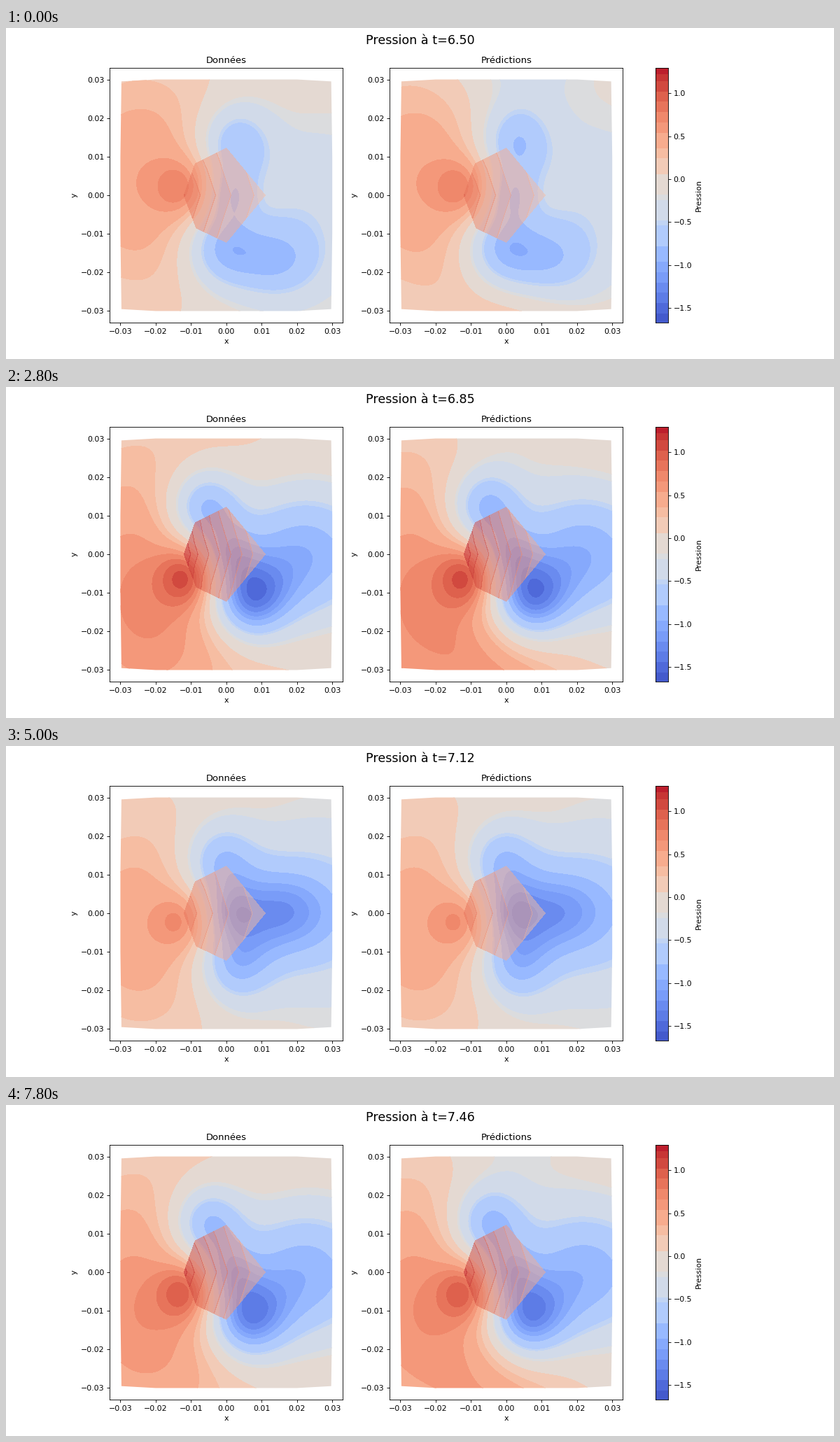
A matplotlib script for the animation above (8 s loop, 1183 by 473 pixels).

```python
import numpy as np
import matplotlib.pyplot as plt
from matplotlib.animation import FuncAnimation
from matplotlib.patches import Polygon

W, H, DPI = 1183, 473, 79
FRAMES, INTERVAL = 40, 200
P_MIN, P_MAX = -1.667, 1.293
UNIT = 0.01  # the flow is modelled in hundredths of the axis unit

plt.rcParams["font.family"] = "DejaVu Sans"

# Fine bands at both ends, wide ones around zero
EDGES = np.concatenate([[P_MIN], np.arange(-1.56, -0.9, 0.12),
                        [-0.78, -0.54, -0.48, -0.24, -0.18, 0.06, 0.24, 0.36],
                        np.arange(0.54, 1.2, 0.12), [1.22, P_MAX]])
mids = (EDGES[:-1] + EDGES[1:]) / 2
mids = mids - 0.04 * np.sign(mids + 0.21)
COLORS = plt.get_cmap("coolwarm")((mids - P_MIN) / (P_MAX - P_MIN))

axis = np.linspace(-3.05, 3.05, 150)
X, Y = np.meshgrid(axis, axis)

# Flow state at a few times: the vortex position and depth, the tilt of the
# incoming flow in degrees and the ambient pressure
KEY_TIMES = [0, 7, 14, 21, 29, 35, 39]
TILT = [9, -16, -28, -31, 13, 1, -24]
AMBIENT = [-0.12, -0.08, 0.08, -0.2, -0.1, -0.1, 0.03]
VORTEX_X = [1.37, 1.9, 0.8, 0.65, 1.9, 1.5, 0.85]
VORTEX_Y = [-1.72, -1.0, -1.0, -1.1, 1.2, 1.5, -1.05]
VORTEX_DEPTH = [0.66, 0.4, 0.25, 0.15, 0.9, 0.62, 0.25]

# Coarse triangles that bridge the obstacle: W, NW, N, E, S, SW
HOLE = UNIT * np.array([(-1.2, 0), (-0.88, 0.82), (0, 1.22),
                        (1.1, 0), (0, -1.22), (-0.85, -0.85)])
HOLE_TRI = [(0, 3, 2), (0, 2, 1), (0, 4, 3), (0, 5, 4)]
BRIDGE = np.array([1, 0.8, 0.5, 0.3, 0.5, 0.8])


def bump(x, y, sx, sy=None):
    sy = sy or sx
    return np.exp(-((X - x) / sx) ** 2 / 2 - ((Y - y) / sy) ** 2 / 2)


def polar(radius, angle):
    return radius * np.cos(angle), radius * np.sin(angle)


def pressure(n, predicted):
    """Pressure on the grid and the stagnation pressure for frame n."""
    tilt, ambient, vx, vy, depth = (
        np.interp(n, KEY_TIMES, v)
        for v in (TILT, AMBIENT, VORTEX_X, VORTEX_Y, VORTEX_DEPTH))
    front = np.pi - np.radians(tilt)
    peak = 0.33 + 0.013 * abs(tilt)
    suction = 0.64 + 0.013 * abs(tilt)
    if predicted:
        vx *= 0.85

    p = ambient + 0.65 * bump(*polar(2.4, front), 2.0, 2.4)
    p += peak * bump(*polar(1.2, front), 0.55)
    for side in (-1, 1):
        p -= suction * bump(*polar(1.35, front + side * np.pi / 2), 0.75)
    p -= (0.5 - 0.02 * tilt) * bump(2.1, 0, 1.7, 1.3)
    p -= depth * bump(vx, vy, 1.0, 0.75)
    p -= 0.5 * bump(0.1, 0, 0.5)
    if predicted:
        # The prediction is too high beside the vortex and too low opposite
        p += 0.28 * np.tanh(2 * vy) * Y * abs(Y) / 9 * bump(0.2, 0, 1.3, 9)
    return p, ambient + 0.58 + peak


def clamp(p):
    return np.clip(p, P_MIN + 0.001, P_MAX - 0.001)


fig = plt.figure(figsize=(W / DPI, H / DPI), dpi=DPI, facecolor="white")


def pixel_axes(x0, x1, y0=57, y1=421):
    return fig.add_axes([x0 / W, 1 - y1 / H, (x1 - x0) / W, (y1 - y0) / H])


# Quarter outline of the domain, mirrored around both axes
quarter = np.array([(3, 1), (2.97, 2.95), (2, 3)])
half = np.vstack([quarter, quarter[::-1] * (-1, 1)])
OUTLINE = UNIT * np.vstack([half, -half])

panels = []
for name, left in (("Données", 148.3), ("Prédictions", 548.3)):
    ax = pixel_axes(left, left + 333)
    ticks = np.arange(-3, 4) * UNIT
    ax.set(xlim=(-0.033, 0.033), ylim=(-0.033, 0.033), xlabel="x", ylabel="y",
           xticks=ticks, yticks=ticks, title=name)
    clip = Polygon(OUTLINE, facecolor="none", edgecolor="none")
    ax.add_patch(clip)
    panels.append((ax, clip))

bar = pixel_axes(927.5, 946)
for low, high, color in zip(EDGES[:-1], EDGES[1:], COLORS):
    bar.axhspan(low, high, color=color, linewidth=0)
bar.set(xlim=(0, 1), ylim=(P_MIN, P_MAX), xticks=[],
        yticks=np.arange(-1.5, 1.1, 0.5))
bar.yaxis.tick_right()
bar.yaxis.set_label_position("right")
bar.set_ylabel("Pression")

title = fig.suptitle("", fontsize=16, y=0.982)
drawn = []


def update(n):
    while drawn:
        drawn.pop().remove()
    title.set_text(f"Pression à t={6.504 + 0.02455 * n:.2f}")
    for predicted, (ax, clip) in enumerate(panels):
        field, stagnation = pressure(n, predicted)
        flow = ax.contourf(X * UNIT, Y * UNIT, clamp(field),
                           levels=EDGES, colors=COLORS)
        flow.set_clip_path(clip)
        hole = ax.tricontourf(HOLE[:, 0], HOLE[:, 1], HOLE_TRI,
                              clamp(stagnation * BRIDGE),
                              levels=EDGES, colors=COLORS, alpha=0.5)
        drawn.extend([flow, hole])
    return drawn


anim = FuncAnimation(fig, update, frames=FRAMES, interval=INTERVAL,
                     repeat=True, repeat_delay=0, blit=False)
plt.show()
```
